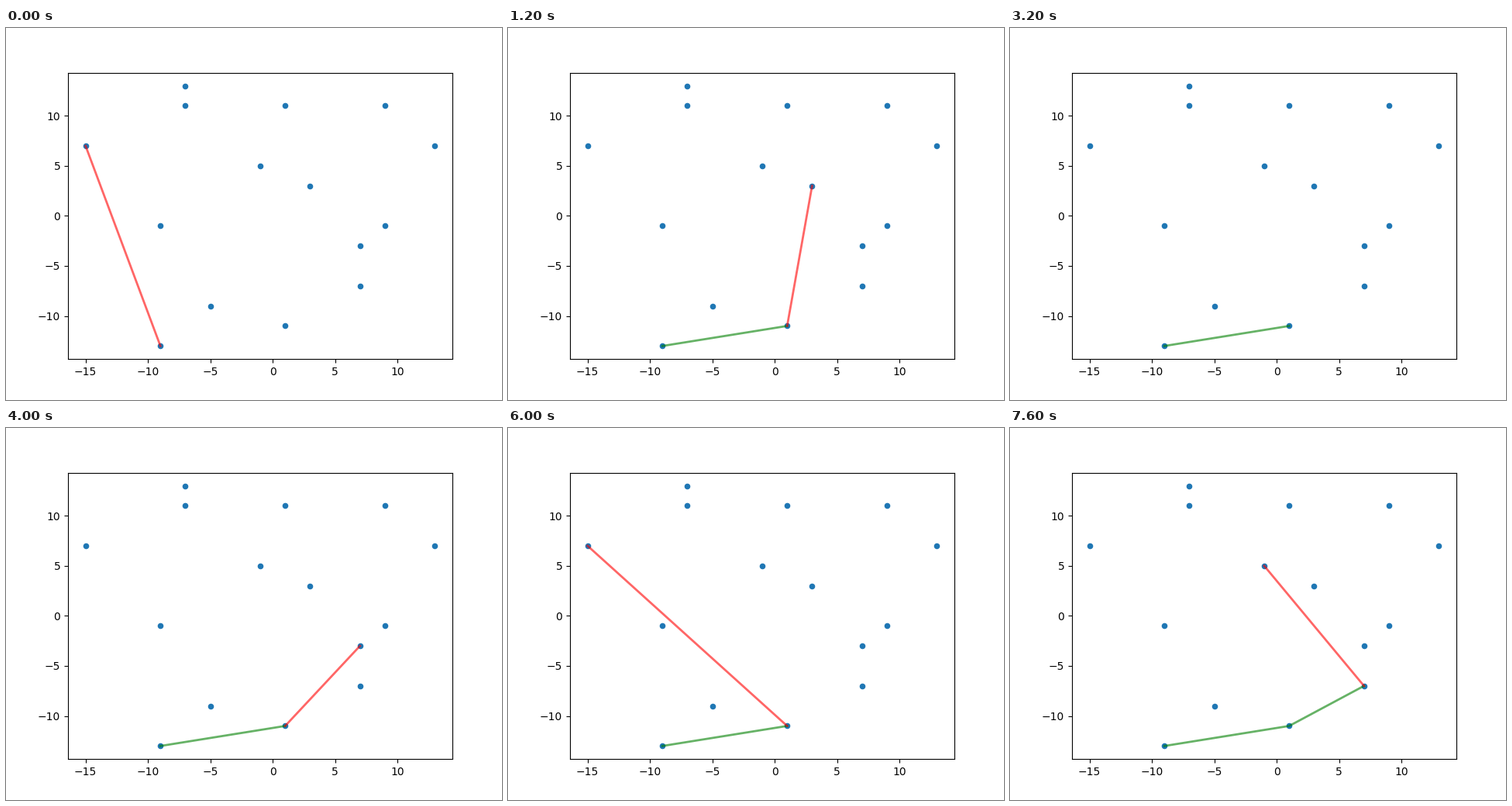
Recreate the animation shown at these times as a matplotlib script. Size 640x480 px, loop 8 s.

```python
import math

import matplotlib.pyplot as plt
from matplotlib.animation import FuncAnimation

# Points in the order in which the gift-wrapping search tests them
POINTS = [
    (3, 3), (-1, 5), (-9, -1), (9, 11), (-7, 13),
    (1, -11), (-5, -9), (7, -3), (-9, -13), (7, -7),
    (1, 11), (-7, 11), (-15, 7), (9, -1), (13, 7),
]
FRAMES = 20
INTERVAL = 400
FIRST_STEP = 12  # the loop opens late in the first search
MARKER_AREA = 20
MARGIN = 0.05


def turn(a, b, c):
    """Positive when c lies to the left of the line from a to b."""
    return (b[0] - a[0]) * (c[1] - a[1]) - (b[1] - a[1]) * (c[0] - a[0])


def next_corner(corner):
    best = next(p for p in POINTS if p != corner)
    for point in POINTS:
        if turn(corner, best, point) < 0:
            best = point
    return best


def wrap(searches):
    """Hull corners known once the given number of searches is done."""
    hull = [min(POINTS, key=lambda p: (p[1], p[0]))]
    for _ in range(searches):
        hull.append(next_corner(hull[-1]))
    return hull


def padded_limits(values, axes_pixels):
    # Data range widened by the marker radius on a unit axis, then the margin
    radius = math.sqrt(MARKER_AREA) / 2 * fig.dpi / 72 / axes_pixels
    low, high = min(values) - radius, max(values) + radius
    margin = MARGIN * (high - low)
    return low - margin, high + margin


fig, ax = plt.subplots(figsize=(6.4, 4.8), dpi=100)
xs, ys = zip(*POINTS)
ax.scatter(xs, ys, s=MARKER_AREA, color="tab:blue")
ax.set_xlim(padded_limits(xs, ax.bbox.width))
ax.set_ylim(padded_limits(ys, ax.bbox.height))

line_style = dict(linewidth=2, alpha=0.6)
hull_line, = ax.plot([], [], color="green", **line_style)
test_line, = ax.plot([], [], color="red", **line_style)


def update(frame):
    searches, candidate = divmod(frame + FIRST_STEP, len(POINTS))
    hull = wrap(searches)
    hull_line.set_data(*zip(*hull))
    test_line.set_data(*zip(hull[-1], POINTS[candidate]))
    return hull_line, test_line


animation = FuncAnimation(fig, update, frames=FRAMES, interval=INTERVAL,
                          repeat=True, repeat_delay=0)
plt.show()
```
